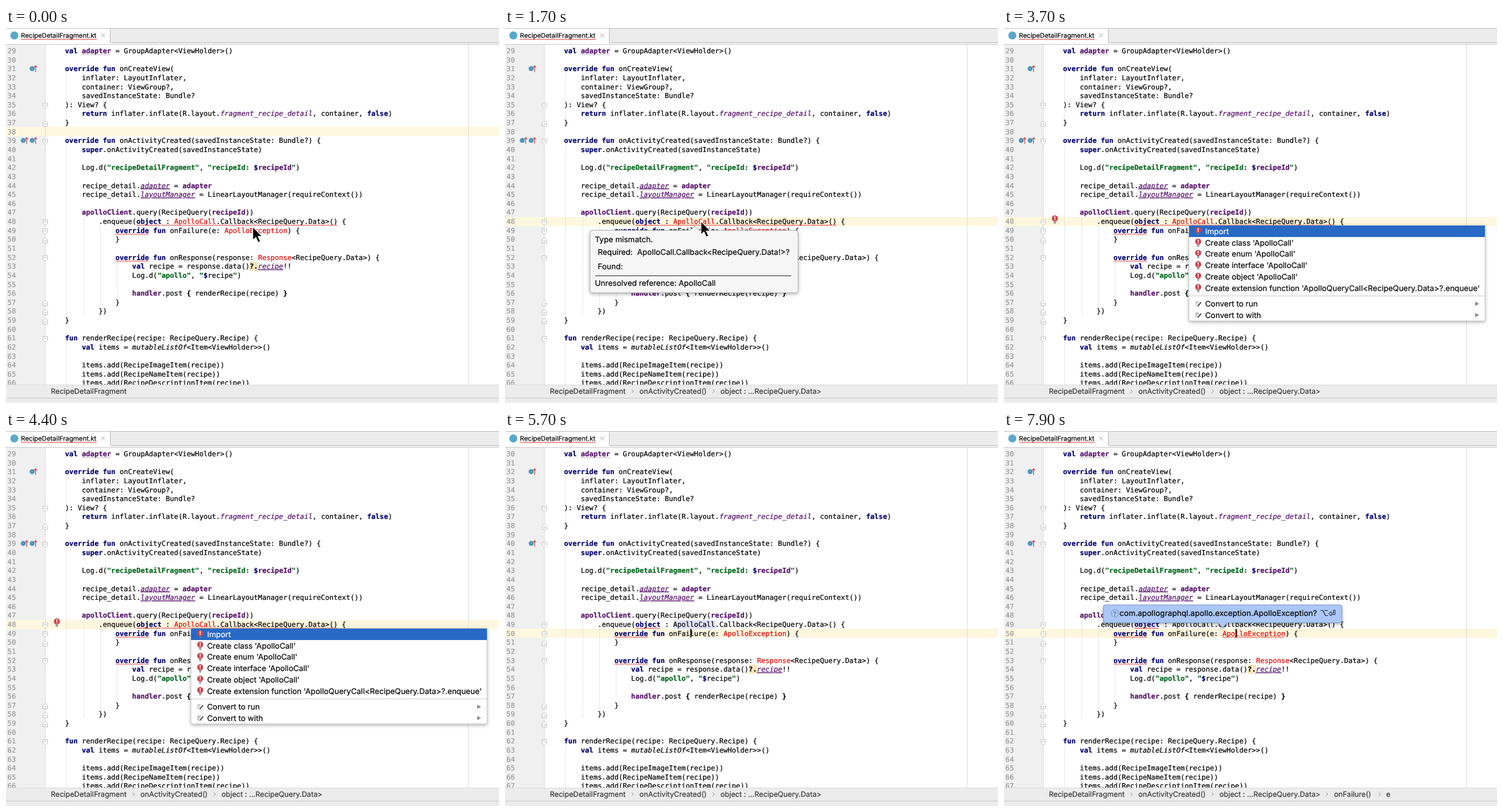
Write an HTML page that moves like this. It is 858x653 px and loops after 8000 ms.

```html
<!DOCTYPE html>
<html lang="en">
<head>
<meta charset="utf-8">
<title>Code editor</title>
<style>
  html, body { margin: 0; width: 100%; height: 100%; overflow: hidden; background: #fff; }
  svg { display: block; }
  text {
    white-space: pre; text-rendering: geometricPrecision;
    font: 13.5px Inter, "Open Sans", sans-serif; --c: #080808;
  }
  text, tspan { fill: var(--c); stroke: var(--c); stroke-width: .22px; }
  .code text { font: 12.133px "DejaVu Sans Mono", "Noto Sans Mono", monospace; --c: #000; }
  .code .num { --c: #999; }
  .crumbs text { font-size: 12.7px; --c: #3c3c3c; }
  .k, .f, .g, .B { font-weight: bold; }
  .k { --c: #000073; }
  .f { --c: #55106a; }
  .g { --c: #00661a; }
  .i, .u, .m { font-style: italic; }
  .i, .u { --c: #55106a; }
  .u { text-decoration: underline; }
  .r { --c: #f00000; }
  .shadow { filter: drop-shadow(0 2px 3px rgba(0, 0, 0, .3)); }
</style>
</head>
<body>
<script>
const LOOP = 8000, STEP = 100;
const X0 = 73.6, COL = 7.305, TOP = 44, ROW = 15.635;

const SOURCE = `    [k|val] [f|adapter] = GroupAdapter<ViewHolder>()

    [k|override fun] onCreateView(
        inflater: LayoutInflater,
        container: ViewGroup?,
        savedInstanceState: Bundle?
    ): View? {
        [k|return] inflater.inflate(R.layout.[i|fragment_recipe_detail], container, [k|false])
    }

    [k|override fun] onActivityCreated(savedInstanceState: Bundle?) {
        [k|super].onActivityCreated(savedInstanceState)

        Log.d([g|"recipeDetailFragment"], [g|"recipeId: ][k|$][f|recipeId][g|"])

        recipe_detail.[u|adapter] = [f|adapter]
        recipe_detail.[u|layoutManager] = LinearLayoutManager(requireContext())

        [f|apolloClient].query(RecipeQuery([f|recipeId]))
            .enqueue([k|object] : [call r|ApolloCall].Callback<RecipeQuery.Data>() {
                [k|override fun] onFailure(e: [r|ApolloException]) {
                }

                [k|override fun] onResponse(response: [r|Response]<RecipeQuery.Data>) {
                    [k|val] recipe = response.data()[B|?.][u|recipe]!!
                    Log.d([g|"apollo"], [g|"][k|$]recipe[g|"])

                    [f|handler].post [B|{] renderRecipe(recipe) [B|}]
                }
            })
    }

    [k|fun] renderRecipe(recipe: RecipeQuery.Recipe) {
        [k|val] items = [m|mutableListOf]<Item<ViewHolder>>()

        items.add(RecipeImageItem(recipe))
        items.add(RecipeNameItem(recipe))
        items.add(RecipeDescriptionItem(recipe))`.split("\n");

const esc = s => s.replace(/&/g, "&amp;").replace(/</g, "&lt;").replace(/>/g, "&gt;");
const colX = c => X0 + c * COL;
const base = r => TOP + r * ROW;
const mid = r => base(r) - 4;
const rowTop = r => Math.round(mid(r) - 8.3);

const rect = (x, y, w, h, fill, more = "") =>
  `<rect x="${x}" y="${y}" width="${w}" height="${h}" fill="${fill}" ${more}/>`;
const path = (d, stroke, more = "") => `<path d="${d}" fill="none" stroke="${stroke}" ${more}/>`;
const label = (x, y, s, more = "") => `<text x="${x}" y="${y}" ${more}>${esc(s)}</text>`;
const group = (id, body, more = "") => `<g id="${id}" ${more}>${body}</g>`;

function wave(x1, x2, y, color = "#e02020") {
  let d = `M${x1} ${y}`;
  for (let x = x1 + 2, up = 1; x <= x2; x += 2, up = 1 - up) d += `L${x} ${y - 1.6 * up}`;
  return path(d, color);
}
const codeWave = (row, from, to, color) => wave(colX(from), colX(to), base(row) + 3.2, color);

function codeLine(line, row) {
  const body = esc(line).replace(/\[([\w ]+)\|(.*?)\]/g, '<tspan class="$1">$2</tspan>');
  return `<text x="${X0}" y="${base(row)}">${body}</text>`;
}

// Fold handle: pentagon pointing down at a block start, up at its end.
function fold(row, dir) {
  const y = mid(row) + 1.5;
  return `<g transform="translate(68.5 ${y}) scale(1 ${dir})">` +
    '<path d="M-4-4.5H4V1.5L0 5L-4 1.5Z" fill="#fff" stroke="#bdbdbd"/>' +
    path("M-2-1H2", "#a8a8a8") + "</g>";
}

function overrideMark(x, row) {
  const y = mid(row) - .5;
  return `<circle cx="${x}" cy="${y}" r="4.5" fill="#4fa9cd"/>` +
    `<circle cx="${x}" cy="${y}" r="1.8" fill="#9ccfe2" stroke="#2f566c"/>` +
    path(`M${x + 6} ${y + 6}V${y - 5}M${x + 3.4} ${y - 2}L${x + 6} ${y - 5}L${x + 8.6} ${y - 2}`, "#d3424c", 'stroke-width="1.3"');
}

function guide(col, first, last) {
  const x = Math.round(colX(col) + 2.5) + .5;
  return path(`M${x} ${rowTop(first)}V${rowTop(last + 1)}`, "#cfcfcf", 'stroke-dasharray="1 1"');
}

function bulb(x, y) {
  return `<circle cx="${x}" cy="${y - 1.5}" r="5.3" fill="#cc454e"/>` +
    path(`M${x} ${y - 5}V${y - 1}M${x} ${y}V${y + 1.6}`, "#fff", 'stroke-width="1.7"') +
    path(`M${x - 2.5} ${y + 4.8}h5M${x - 2} ${y + 6.8}h4`, "#777", 'stroke-width="1.2"');
}

const pencil = (x, y) =>
  path(`M${x - 5} ${y - 3.5}h6M${x - 5} ${y - .5}h4M${x - 5} ${y + 2.5}h2`, "#777", 'stroke-width="1.2"') +
  path(`M${x - 1} ${y + 4}L${x + 5} ${y - 3}`, "#555", 'stroke-width="2.2"');

const crumb = (x, s, sep) =>
  (sep ? path(`M${sep - 1.5} 629.5l3 3l-3 3`, "#8a8a8a") : "") + label(x, 637.3, s);

function editor() {
  const numbers = SOURCE.map((_, r) => `<text class="num" x="2.6" y="${base(r)}"></text>`).join("");
  return rect(0, 29, 858, 592, "#fff") + rect(0, 29, 68, 592, "#f0f0f0") +
    `<rect id="row" width="858" height="16" fill="#fef7df"/>` +
    path("M68.5 29V621M804.5 29V621", "#dadada") +
    guide(4, 3, 5) + guide(4, 7, 7) + guide(4, 11, 29) + guide(8, 19, 29) + guide(12, 20, 28) +
    guide(16, 24, 27) + guide(4, 33, 37) +
    rect(colX(48), rowTop(24), COL * 2, 16, "#f6e6bb") +
    group("usage", rect(colX(30), rowTop(19), COL * 10, 16, "#e2e2fb")) +
    numbers + SOURCE.map(codeLine).join("") +
    codeWave(0, 8, 15, "#b9a9bd") + codeWave(20, 16, 24) + codeWave(23, 16, 24) +
    codeWave(19, 21, 27) + group("mismatch", codeWave(19, 27, 69)) +
    group("unknown", codeWave(20, 42, 57)) +
    [6, 10, 19, 20, 23, 32].map(r => fold(r, 1)).join("") +
    [8, 21, 28, 29, 30].map(r => fold(r, -1)).join("") +
    overrideMark(45.5, 2) + overrideMark(45.5, 10) + group("extra", overrideMark(30, 10)) +
    group("lamp", bulb(88.5, 333)) +
    '<rect id="caret" width="2" height="15" fill="#000"/>';
}

function tabs() {
  return rect(0, 0, 858, 29, "#ececec") + rect(0, 1, 182, 28, "#fff") + rect(182, 25, 676, 4, "#fafafa") +
    path("M0 .5H858", "#bcbcbc") + path("M181.5 1V25M182 25.5H858", "#b4b4b4") + path("M0 28.5H858", "#c6c6c6") +
    '<circle cx="14.5" cy="13" r="7" fill="#58a9cb"/>' +
    label(26, 17, "RecipeDetailFragment.kt", 'style="font-size:11.35px"') + wave(26, 158, 20.5) +
    path("M165.5 9.5l7 7m0-7l-7 7", "#b0b0b0");
}

function status() {
  return rect(0, 621, 858, 32, "#ececec") + path("M0 621.5H858", "#dcdcdc") + path("M0 644.5H858", "#c4c4c4") +
    group("crumbs",
      crumb(78, "RecipeDetailFragment") +
      group("crumbCall", crumb(234, "onActivityCreated()", 222) + crumb(375, "object : ...RecipeQuery.Data>", 363)) +
      group("crumbFail", crumb(574.5, "onFailure()", 562)) +
      group("crumbArg", crumb(665, "e", 654)), 'class="crumbs"');
}

function tooltip() {
  return group("tip",
    '<path class="shadow" d="M152 352.5H322L330 345L338 352.5H506Q510 352.5 510 356.5V457Q510 461 506 461H152Q148 461 148 457V356.5Q148 352.5 152 352.5Z" fill="#f6f6f6" stroke="#b0b0b0"/>' +
    label(156.5, 372.5, "Type mismatch.") + label(161.5, 394.5, "Required:") +
    label(230, 394.5, "ApolloCall.Callback<RecipeQuery.Data!>?") + label(161.5, 419.5, "Found:") +
    path("M157 431.5H498", "#222") + label(156.5, 448.5, "Unresolved reference: ApolloCall"));
}

function menu() {
  const fixes = ["Import", "Create class 'ApolloCall'", "Create enum 'ApolloCall'", "Create interface 'ApolloCall'",
    "Create object 'ApolloCall'", "Create extension function 'ApolloQueryCall<RecipeQuery.Data>?.enqueue'"];
  const intents = ["Convert to run", "Convert to with"];
  return group("menu",
    rect(322, 344, 515, 166, "#fff", 'class="shadow" stroke="#c4c4c4" stroke-width=".8"') +
    rect(322, 344, 515, 20, "#2869c5") +
    fixes.map((s, i) => bulb(338, 353.5 + i * 19.8) +
      label(350, 358.8 + i * 19.8, s, i ? "" : 'style="--c:#fff"')).join("") +
    path("M322 466.5H837", "#c9c9c9") +
    intents.map((s, i) => pencil(338, 480.5 + i * 19.7) + label(350, 485.3 + i * 19.7, s) +
      `<path d="M820 ${476.5 + i * 19.7}l7 3.7l-7 3.7z" fill="#8f8f8f"/>`).join(""));
}

function hint() {
  return group("hint",
    '<path class="shadow" d="M176 303H585Q588 303 588 306V331Q588 334 585 334H388L380.5 343L373 334H176Q173 334 173 331V306Q173 303 176 303Z" fill="#abc7f7" stroke="#7896c4"/>' +
    '<circle cx="193" cy="317.5" r="6.5" fill="none" stroke="#7f8ea8"/>' +
    label(190, 321.5, "?", 'style="font-size:10.5px;--c:#66758e"') +
    label(201, 322.3, "com.apollographql.apollo.exception.ApolloException?", 'style="font-size:13.6px"') +
    path("M551 312.5h4l4.5 9h4M557.5 312.5h6", "#111", 'stroke-width="1.2"') +
    path("M573.5 312h2.5v7.5h-7v2.5l-4-3.7l4-3.7v2.4h4.5z", "#111"));
}

document.body.innerHTML =
  '<svg width="858" height="653" viewBox="0 0 858 653">' +
  group("code", editor(), 'class="code"') + tabs() + status() + tooltip() + menu() + hint() +
  group("mouse", '<path d="M0 0V23.5L5.3 18.5L9.3 27.5L13.3 25.7L9.4 17H16.5Z" fill="#000" stroke="#fff" stroke-width="1.3"/>') +
  "</svg>";

const el = id => document.getElementById(id);
const numberCells = [...document.querySelectorAll(".num")];
const callName = document.querySelector(".call");

// Visible spans in ms: [start, end).
const SPANS = {
  tip: [1200, 2000], mouse: [0, 2200], menu: [3300, 4500], lamp: [3200, 4500], hint: [7000, LOOP],
  mismatch: [0, 4900], extra: [0, 5200], usage: [5200, 6100], unknown: [7000, LOOP],
  crumbCall: [800, LOOP], crumbFail: [6300, LOOP], crumbArg: [6800, LOOP]
};
const show = (id, on) => el(id).setAttribute("visibility", on ? "visible" : "hidden");
const ramp = (t, a, b) => Math.min(1, Math.max(0, (t - a) / (b - a)));
const ease = p => p * p * (3 - 2 * p);
const mix = (a, b, p) => a + (b - a) * p;

function caretOn(t) {
  if (t < 300 || (t >= 3200 && t < 4500)) return false;
  if (t < 5600) return (t + 900) % 1000 < 500;
  return t < 6800 || (t - 6800) % 1000 < 500;
}

function draw(t) {
  for (const id in SPANS) show(id, t >= SPANS[id][0] && t < SPANS[id][1]);

  const row = t < 300 ? 9 : t < 5700 ? 19 : 20;
  el("row").setAttribute("y", rowTop(row));

  const col = 34 + Math.floor(11 * ramp(t, 5700, 6800));
  el("caret").setAttribute("x", colX(col) + .5);
  el("caret").setAttribute("y", rowTop(row) + .5);
  show("caret", caretOn(t));

  const first = t < 4600 ? 29 : 30;
  numberCells.forEach((n, i) => { n.textContent = first + i; });
  callName.classList.toggle("r", t < 4900);

  const go = ease(ramp(t, 0, 300)), drift = ease(ramp(t, 1200, 1500));
  const x = mix(429.5, 329.5, go) + 11.5 * drift;
  const y = mix(346, 337.5, go) - drift;
  el("mouse").setAttribute("transform", `translate(${x} ${y})`);
}

function tick() {
  const t = performance.now() % LOOP;
  draw(Math.floor(t / STEP) * STEP);
  requestAnimationFrame(tick);
}
tick();
</script>
</body>
</html>
```
